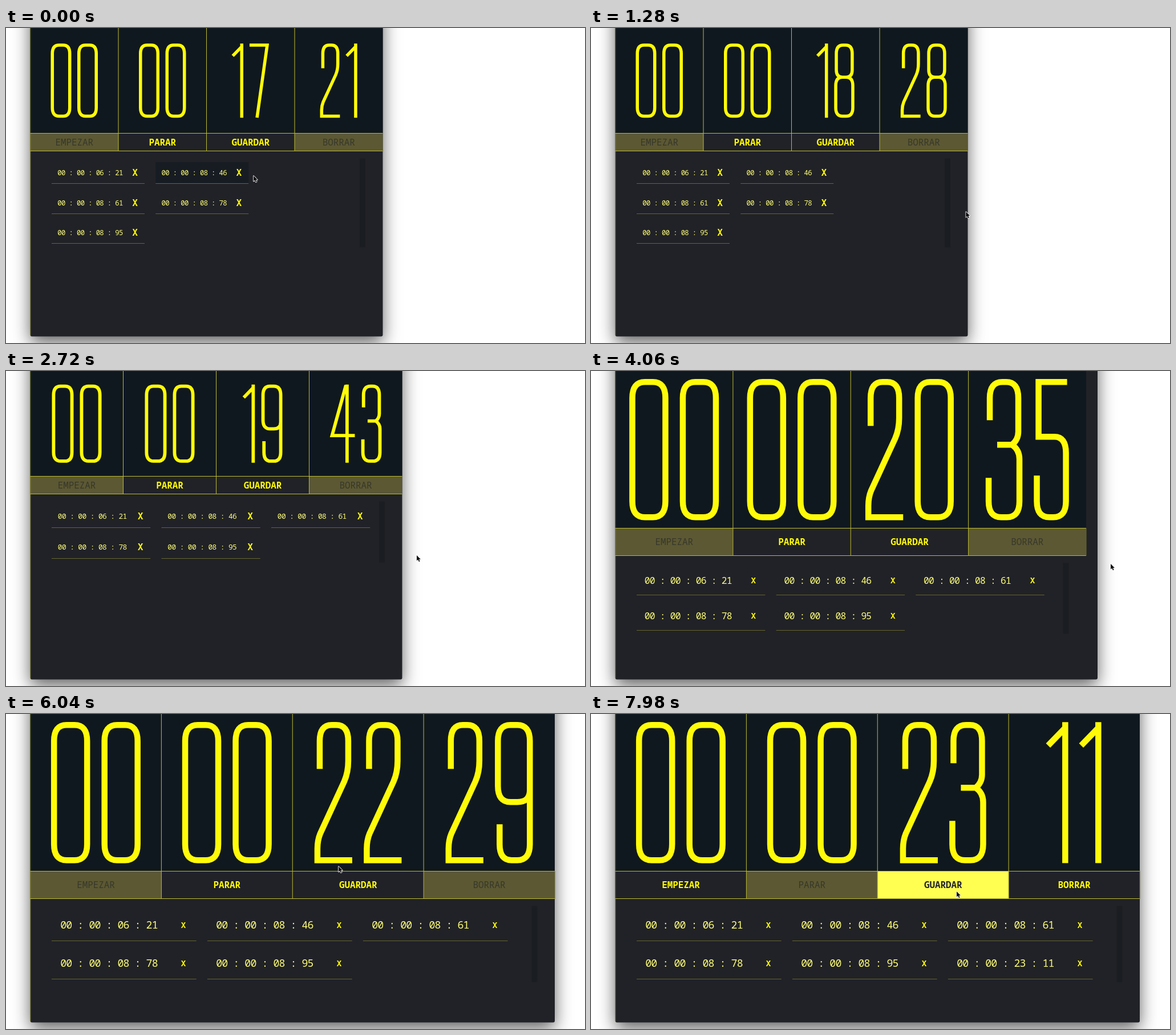
These frames come from a looping animation (1015 px wide and 552 px high, 8000 ms). An HTML page with a canvas:

```html
<!DOCTYPE html>
<html lang="es">
<head>
<meta charset="utf-8">
<title>Cronómetro</title>
<style>
  html, body { margin: 0; width: 100%; height: 100%; overflow: hidden; background: #fff; }
  canvas { display: block; width: 1015px; height: 552px; }
</style>
</head>
<body>
<canvas id="stage" width="1015" height="552"></canvas>
<script>
const ctx = document.getElementById('stage').getContext('2d');
const LOOP = 8000, STEP = 20, LEFT = 42.5, BOTTOM = 540.5;
const STOP = 7020, SAVE = 7920;
const YELLOW = '#fffb08', LINE = '#bdbb30', PANEL = '#212227', FACE = '#10181f';

// Condensed numerals: [width, centre line], 247 units tall
const DIGITS = [
  [68, 'M5 33Q5 5 27 5H41Q63 5 63 33V214Q63 242 41 242H27Q5 242 5 214Z'],
  [37.5, 'M2 41L33 9M32 0V247'],
  [66, 'M9 82V33Q9 5 30 5H38Q59 5 59 33V68Q59 88 52 104L10 195Q5 207 5 222V242H66'],
  [64, 'M7 72V33Q7 5 29 5H36Q57 5 57 33V92Q57 106 46 115Q59 124 59 140V214Q59 242 37 242H27Q5 242 5 214V173M20 115H46'],
  [79, 'M54.5 247V0M51 2L7 161H79'],
  [61, 'M58 5H8V101H36Q56 101 56 129V214Q56 242 34 242H27Q5 242 5 214V169'],
  [66, 'M5 128Q5 107 27 107H39Q61 107 61 135V214Q61 242 39 242H27Q5 242 5 214V33Q5 5 27 5H37Q58 5 58 33V68'],
  [65, 'M0 5H59L25 247'],
  [67, 'M29 5H38Q60 5 60 33V88Q60 112 40 112H27Q7 112 7 88V33Q7 5 29 5ZM27 112H40Q62 112 62 140V214Q62 242 40 242H27Q5 242 5 214V140Q5 112 27 112Z'],
  [66, 'M61 119Q61 140 39 140H27Q5 140 5 112V33Q5 5 27 5H39Q61 5 61 33V214Q61 242 39 242H29Q8 242 8 214V179']
].map(([w, d]) => ({ w, path: new Path2D(d) }));

const ARROW = new Path2D('M0 0V9.6L2.3 7.6L3.9 11.2L5.6 10.4L4 7H6.9Z');

// Keyframes: [ms, value, ...]
const COUNT = [[0, 1721], [1280, 1828], [2720, 1943], [4060, 2035], [6040, 2229], [6820, 2294], [STOP, 2311]];
const FRAME = [[2500, 660.5], [2720, 694.5], [3280, 812], [4060, 888], [4920, 935], [5300, 962]];
const LAYOUT = [[2500, 660.5], [2720, 694.5], [3280, 796], [4060, 868], [4920, 926], [5340, 962]];
const MOUSE = [
  [0, 434, 259], [1150, 657, 322], [2450, 660, 323], [2720, 720, 323], [3280, 836, 330],
  [4060, 911, 338], [4920, 946, 338], [5300, 960, 336], [5700, 960, 335], [6040, 583, 267],
  [6820, 367, 300], [7050, 367, 300], [7700, 641, 311]
];

function sample(keys, t, k = 1) {
  if (t <= keys[0][0]) return keys[0][k];
  for (let i = 1; i < keys.length; i++) {
    const a = keys[i - 1], b = keys[i];
    if (t < b[0]) return a[k] + (b[k] - a[k]) * (t - a[0]) / (b[0] - a[0]);
  }
  return keys[keys.length - 1][k];
}

const pad = n => String(n).padStart(2, '0');

function rect(color, x, y, w, h) {
  ctx.fillStyle = color;
  ctx.fillRect(x, y, w, h);
}

// Evenly pitched characters, centred vertically on cy
function mono(text, x, cy, size, pitch, color, weight = 400) {
  ctx.font = `${weight} semi-condensed ${size}px "Noto Sans Mono", monospace`;
  ctx.textAlign = 'center';
  ctx.fillStyle = color;
  [...text].forEach((c, i) => ctx.fillText(c, x + (i + 0.5) * pitch, cy + size * 0.357));
}

function bigPair(text, cx, cy, scale) {
  const gap = 20.5, pair = [...text].map(c => DIGITS[c]);
  ctx.save();
  ctx.translate(cx, cy);
  ctx.scale(scale, scale);
  ctx.translate(-(pair[0].w + gap + pair[1].w) / 2, -123.5);
  ctx.strokeStyle = YELLOW;
  ctx.lineWidth = 10.5;
  for (const d of pair) {
    ctx.stroke(d.path);
    ctx.translate(d.w + gap, 0);
  }
  ctx.restore();
}

function windowFrame(right) {
  ctx.save();
  ctx.shadowColor = 'rgba(0,0,0,.62)';
  ctx.shadowBlur = 30;
  ctx.shadowOffsetY = 11;
  ctx.fillStyle = PANEL;
  ctx.beginPath();
  ctx.roundRect(LEFT, -60, right - LEFT, BOTTOM + 60, 3);
  ctx.fill();
  ctx.restore();
}

function button(label, state, x, y, w, h) {
  const [bg, fg, weight] = {
    on: [PANEL, YELLOW, 600],
    off: ['#5b5833', '#38382a', 400],
    down: ['#ffff52', '#23242a', 600]
  }[state];
  rect(bg, x, y, w, h);
  mono(label, x + w / 2 - label.length * 4.75, y + h / 2, 16, 9.5, fg, weight);
}

function face(t, right, big) {
  const inner = right - LEFT, cell = inner / 4;
  const h = big ? 275.5 : 184.5, bh = big ? 48 : 31;
  const count = Math.floor(sample(COUNT, t) + 1e-6);
  const parts = ['00', '00', pad(Math.floor(count / 100)), pad(count % 100)];
  const stopped = t >= STOP, idle = stopped ? 'on' : 'off';
  const states = [
    idle,
    stopped ? 'off' : t >= STOP - 60 ? 'down' : 'on',
    t >= 7840 ? 'down' : 'on',
    idle
  ];
  rect(FACE, LEFT, 0, inner, h);
  ['EMPEZAR', 'PARAR', 'GUARDAR', 'BORRAR'].forEach((label, i) => {
    const x = LEFT + i * cell;
    bigPair(parts[i], x + cell / 2, h / 2, big ? 1 : inner * 0.21 / 247);
    button(label, states[i], x, h, cell, bh);
    if (i) rect(LINE, x - 0.5, 0, 1, h + bh);
  });
  rect(LINE, LEFT, h - 0.5, inner, 1);
  rect(LINE, LEFT, h + bh - 0.5, inner, 1);
  if (big) rect('#66652f', right - 0.5, h, 1, bh);
  return h + bh;
}

function laps(t, right, top, big) {
  const inner = right - LEFT, p = inner * 0.0109;
  const pitchX = 192.5 + 0.3008 * (inner - 652), w = pitchX - 19.3;
  const pitchY = 22 + 4.5 * p, cols = inner < 640 ? 2 : 3;
  const times = ['06 : 21', '08 : 46', '08 : 61', '08 : 78', '08 : 95'];
  if (t >= SAVE) times.push('23 : 11');

  times.forEach((time, i) => {
    const x = 80 + (i % cols) * pitchX;
    const y = Math.round(top + 24.6 + 4.88 * p + Math.floor(i / cols) * pitchY - 0.5);
    const cy = y + 0.5 - 2.82 * p;
    if (i === 1 && t < 160) rect(`rgba(16,24,31,${0.55 * (1 - t / 160)})`, x, y - 37, w, 37);
    rect('#65642f', x, y, w, 1);
    mono('00 : 00 : ' + time, x + 1.57 * p, cy, 1.82 * p, p, '#ffff78');
    mono('X', x + w - 5 - 1.75 * p - 5, cy, big ? 15 : 16.5, 10, YELLOW, 600);
  });
  rect('#1a1d21', right - 40.5, top + 13, 10, Math.ceil(times.length / cols) * pitchY - 1);
}

function cursor(x, y) {
  ctx.save();
  ctx.translate(x, y);
  ctx.lineJoin = 'round';
  ctx.lineWidth = 1.6;
  ctx.strokeStyle = '#fff';
  ctx.stroke(ARROW);
  ctx.fillStyle = '#0b0b0d';
  ctx.fill(ARROW);
  ctx.restore();
}

function draw(t) {
  const right = sample(LAYOUT, t), big = right - LEFT > 752;
  rect('#fff', 0, 0, 1015, 552);
  windowFrame(sample(FRAME, t));
  const top = face(t, right, big);
  laps(t, right, top, big);
  rect('rgba(255,255,0,.28)', LEFT, 0, 1, BOTTOM - 1);
  cursor(sample(MOUSE, t), sample(MOUSE, t, 2));
}

const start = performance.now();
function tick() {
  const t = (performance.now() - start) % LOOP;
  draw(Math.floor(t / STEP) * STEP);
  requestAnimationFrame(tick);
}
tick();
</script>
</body>
</html>
```
